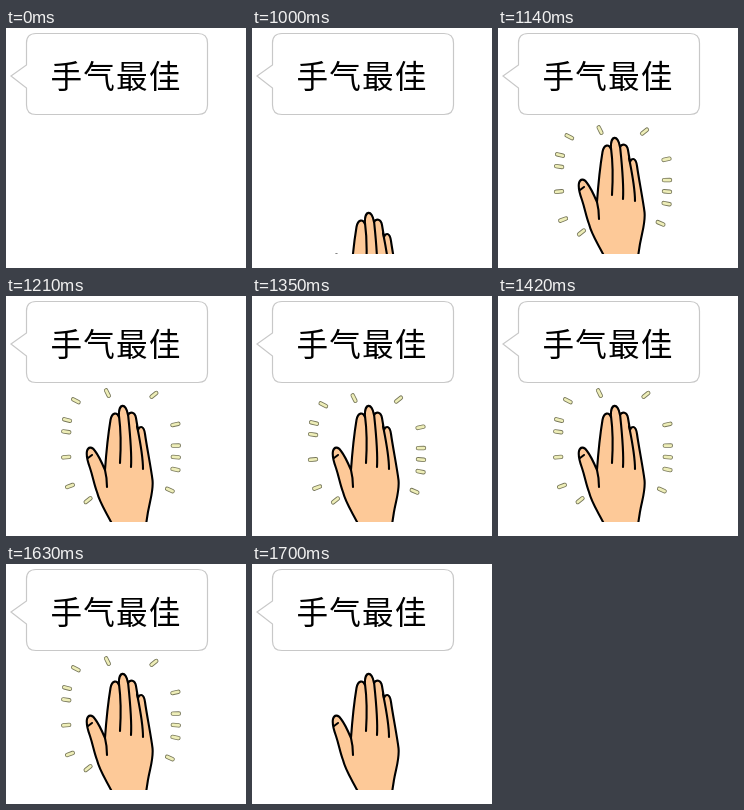
These frames come from a looping animation (240 px wide and 240 px high, 2.7 s). An HTML page:

```html
<!DOCTYPE html>
<html lang="zh">
<head>
<meta charset="utf-8">
<style>
  html, body { margin: 0; width: 100%; height: 100%; overflow: hidden; background: #fff; }
  svg { display: block; width: 100%; height: 100%; }
  text { font: 31.6px "Noto Sans CJK SC", "Noto Sans CJK", sans-serif; letter-spacing: 1.2px; }
  .line { fill: none; stroke: #000; stroke-width: 2.1; stroke-linecap: round; stroke-linejoin: round; }
  .rim { fill: none; stroke: #77775a; stroke-width: 4.4; stroke-linecap: round; }
  .core { fill: none; stroke: #eeeeb8; stroke-width: 2.7; stroke-linecap: round; }
</style>
</head>
<body>
<svg viewBox="0 0 240 240">
  <defs><clipPath id="view"><rect width="240" height="226"/></clipPath></defs>
  <path d="M30 5.500H192Q201.500 5.500 201.500 15V77Q201.500 86.500 192 86.500H30Q20.500 86.500 20.500 77V60L5 48L20.500 37V15Q20.500 5.500 30 5.500Z" fill="#fff" stroke="#c8c8c8" stroke-width="1.2"/>
  <text x="44.400" y="60.300" lang="zh-CN">手气最佳</text>
  <g clip-path="url(#view)">
    <g id="hand">
      <path class="line" style="fill:#fdc998" d="M107 230C101 217 94 208 91 196C88 188 87 181 84 172C81 164 80 160 81 155C82 151 86 150 89 155C93 160 96 167 99 174C100 160 102 139 104.500 124C106 116 111 116 113 121C112 107 120 106 122 119C124 115 129 116 130 122L132 134C134 129 138 130 139 138C141 152 145 172 146.500 184C148 198 142 207 140 230Z"/>
      <path class="line" d="M99 174Q101 182 101 191M113 120C115 135 115 151 114 167M122 118C124 137 126 155 125 171M131 130C134 145 137 159 137 173M82 162L86 159"/>
    </g>
    <path class="rim"/>
    <path class="core"/>
  </g>
</svg>
<script>
const LOOP = 2700, STEP = 70, START = 1000, END = 1700;
const drops = [75, 25, 0];
const angles = [-2, 10, 22, 41, 122, 143, 170, 196, 207, 226, 256, 302, 337];
const hand = document.getElementById("hand");
const rim = document.querySelector(".rim");
const core = document.querySelector(".core");

// Dashes sit on a rounded box around the hand and lean outwards.
function burst(spread) {
  const cx = 115, cy = 154 - spread, rx = 54 + spread / 3, ry = 52 + spread;
  return angles.map(deg => {
    const a = deg * Math.PI / 180, c = Math.cos(a), s = Math.sin(a);
    const r = ((c / rx) ** 4 + (s / ry) ** 4) ** -0.25;
    const tilt = Math.atan2(s / 2, c);
    const x = cx + r * c, y = cy + r * s;
    const dx = 3 * Math.cos(tilt), dy = 3 * Math.sin(tilt);
    return `M${x - dx} ${y - dy}L${x + dx} ${y + dy}`;
  }).join("");
}

const bursts = [burst(0), burst(2.5), ""];

function draw(t) {
  const step = Math.floor((t - START) / STEP);
  hand.style.display = step < 0 ? "none" : "";
  const drop = drops[Math.max(0, Math.min(step, drops.length - 1))];
  hand.setAttribute("transform", `translate(0 ${drop})`);
  const d = step >= 2 && t < END ? bursts[(step - 2) % bursts.length] : "";
  rim.setAttribute("d", d);
  core.setAttribute("d", d);
}

const origin = performance.now();
function tick() {
  draw((performance.now() - origin) % LOOP);
  requestAnimationFrame(tick);
}
tick();
</script>
</body>
</html>
```
